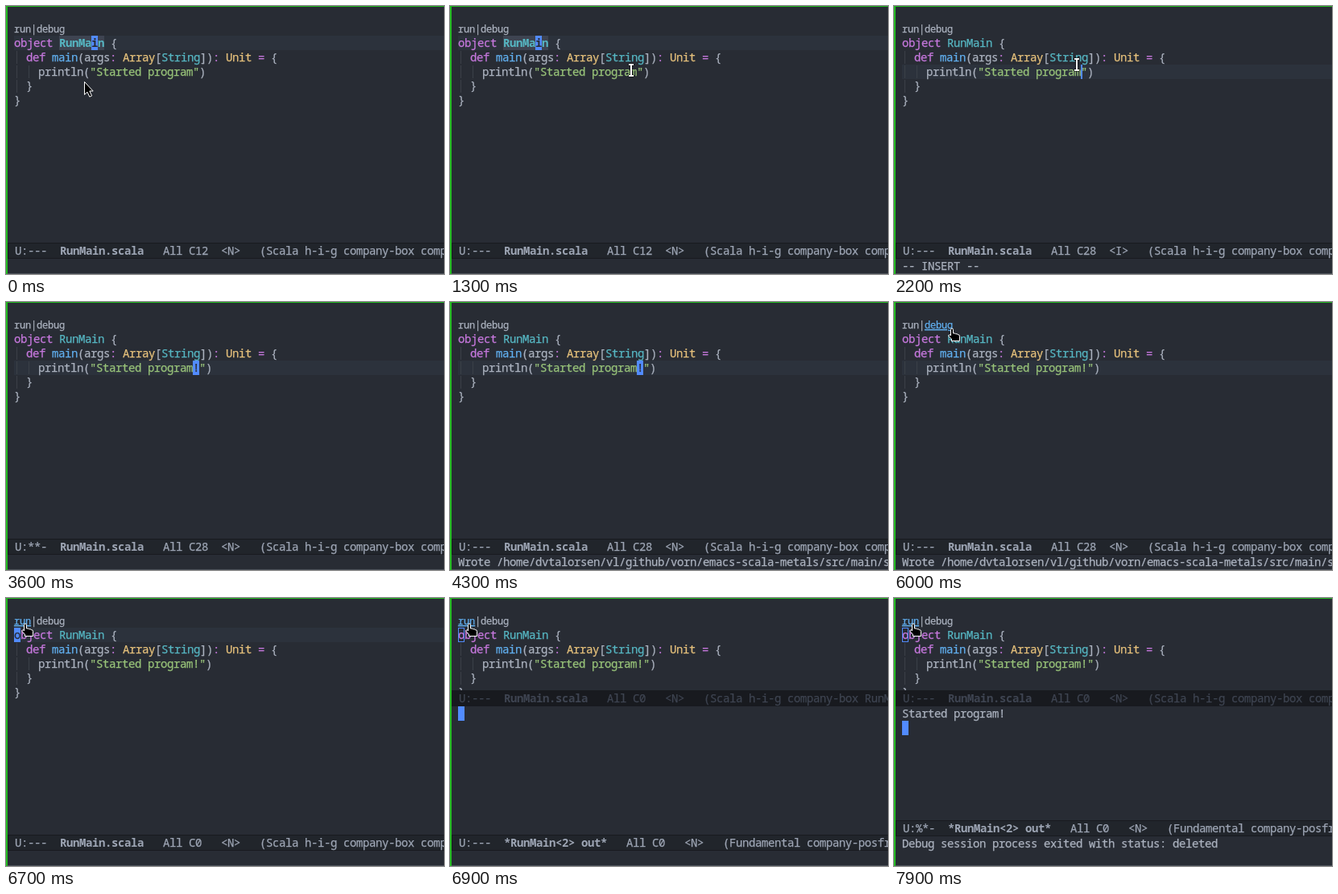
An HTML page for the animation above (8 s loop, 544 by 334 pixels).

```html
<!DOCTYPE html>
<html lang="en">
<head>
<meta charset="utf-8">
<title>Run from the editor</title>
<style>
  html, body { margin: 0; width: 100%; height: 100%; overflow: hidden; background: #282c34; }
  svg { display: block; width: 544px; height: 334px; color: #abb2bf; }
  text { font: 14px "Noto Sans Mono", "DejaVu Sans Mono", monospace; letter-spacing: -.4px; white-space: pre; }
  text, tspan { fill: currentColor; stroke: currentColor; stroke-width: .25px; }
  .lens text { font-size: 12px; letter-spacing: -.2px; }
  .link { color: #61afef; }
  .link text { text-decoration: underline; }
  .bar { color: #9da5b4; }
  .dim { color: #3e4451; }
  .b { font-weight: 600; stroke: none; }
  .kw { color: #c678dd; }
  .fn { color: #61afef; }
  .ty { color: #e5c07b; }
  .cy { color: #56b6c2; }
  .st { color: #98c379; }
  .fg { color: #abb2bf; }
  .hl { fill: #2c323c; }
  .guide { fill: #3b4048; }
  .block { color: #282c34; }
  .block rect, .caret { fill: #528bff; }
  .hollow { fill: none; stroke: #528bff; }
  #mouse path { fill: #000; stroke: #fff; stroke-linejoin: round; }
  #mouse #beam { fill: #fff; stroke: #000; paint-order: stroke; }
</style>
</head>
<body>
<!-- data-show lists the spans, in ms, during which a part is visible -->
<svg viewBox="0 0 544 334">
  <rect width="544" height="334" fill="#282c34"/>

  <g class="lens">
    <text x="31" y="33">|</text>
    <text x="10" y="33" data-show="0-6200">run</text>
    <text x="38" y="33" data-show="0-5900 6100-8000">debug</text>
    <g class="link">
      <text x="10" y="33" data-show="6200-8000">run</text>
      <text x="38" y="33" data-show="5900-6100">debug</text>
    </g>
  </g>

  <rect class="hl" x="10" y="37" width="534" height="18" data-show="0-1600 6700-6900"/>
  <rect class="hl" x="10" y="73" width="534" height="18" data-show="1600-6700"/>
  <rect x="66" y="37" width="56" height="18" fill="#3e4451" data-show="0-1700"/>
  <rect class="guide" x="13" y="56" width="1" height="16"/>
  <rect class="guide" x="13" y="74" width="1" height="16"/>
  <rect class="guide" x="13" y="92" width="1" height="16"/>
  <rect class="guide" x="28" y="74" width="1" height="16"/>

  <text class="kw" x="10" y="51">object</text>
  <text class="cy b" x="66" y="51" data-show="0-1700">RunMain</text>
  <text class="cy" x="66" y="51" data-show="1700-8000">RunMain</text>
  <text x="130" y="51">{</text>
  <text x="25" y="69"><tspan class="kw">def</tspan> <tspan class="fn">main</tspan>(args<tspan class="kw">:</tspan> <tspan class="ty">Array</tspan>[<tspan class="cy">String</tspan>])<tspan class="kw">:</tspan> <tspan class="ty">Unit</tspan> <tspan class="kw">=</tspan> {</text>
  <text x="40" y="87">println(<tspan class="st">"Started program</tspan></text>
  <text class="st" x="232" y="87" data-show="0-2800">"<tspan class="fg">)</tspan></text>
  <text class="st" x="232" y="87" data-show="2800-8000">!"<tspan class="fg">)</tspan></text>
  <text x="25" y="104">}</text>
  <text x="10" y="122">}</text>

  <g class="block">
    <g data-show="0-400 900-1400"><rect x="106" y="37" width="8" height="18"/><text class="b" x="106" y="51">i</text></g>
    <g data-show="1600-2200"><rect x="232" y="73" width="8" height="18"/><text x="232" y="87">"</text></g>
    <g data-show="3600-4100 4300-4900 5400-5900 6400-6700"><rect x="232" y="73" width="8" height="18"/><text x="232" y="87">!</text></g>
    <g data-show="6700-6900"><rect x="10" y="37" width="8" height="18"/><text x="10" y="51">o</text></g>
  </g>
  <rect class="caret" x="232" y="73" width="2" height="18" data-show="2200-2800"/>
  <rect class="caret" x="240" y="73" width="2" height="18" data-show="2800-3400"/>
  <rect class="hollow" x="10.5" y="37.5" width="7" height="17" data-show="6900-8000"/>

  <!-- single window: mode line and echo area -->
  <g class="bar" data-show="0-6900">
    <rect x="2" y="295" width="542" height="20" fill="#181a1f"/>
    <rect x="3" y="296" width="541" height="18" fill="#21252b"/>
    <text x="11" y="310" data-show="0-2800 4300-6900">U:---</text>
    <text x="11" y="310" data-show="2800-4300">U:**-</text>
    <text class="b" x="67" y="310">RunMain.scala</text>
    <text x="195" y="310">All</text>
    <text x="227" y="310" data-show="0-1600">C12</text>
    <text x="227" y="310" data-show="1600-2800 3600-6700">C28</text>
    <text x="227" y="310" data-show="2800-3600">C29</text>
    <text x="227" y="310" data-show="6700-6900">C0</text>
    <text x="267" y="310" data-show="0-2200 3600-6900">&lt;N&gt;</text>
    <text x="267" y="310" data-show="2200-3600">&lt;I&gt;</text>
    <text x="315" y="310">(Scala h-i-g company-box comp</text>
  </g>
  <text x="10" y="329" data-show="2200-2800">-- INSERT --</text>
  <text x="10" y="329" data-show="4300-6700">Wrote /home/dvtalorsen/vl/github/vorn/emacs-scala-metals/src/main/s</text>

  <!-- split window with program output -->
  <g data-show="6900-8000">
    <rect x="2" y="115" width="542" height="219" fill="#282c34"/>
    <g class="dim">
      <rect x="2" y="115" width="542" height="20" fill="#181a1f"/>
      <text x="11" y="130">U:---</text>
      <text class="b" x="67" y="130">RunMain.scala</text>
      <text x="195" y="130">All C0   &lt;N&gt;   (Scala h-i-g company-box</text>
      <text x="515" y="130" data-show="6900-7100">RunM</text>
      <text x="515" y="130" data-show="7100-8000">comp</text>
    </g>
    <text x="10" y="149" data-show="7100-8000">Started program!</text>
    <rect class="caret" x="10" y="135" width="8" height="18" data-show="6900-7100"/>
    <rect class="caret" x="10" y="153" width="8" height="18" data-show="7100-7400 7900-8000"/>
    <g class="bar" id="outBar">
      <rect x="2" y="295" width="542" height="20" fill="#181a1f"/>
      <rect x="3" y="296" width="541" height="18" fill="#21252b"/>
      <text x="11" y="310" data-show="6900-7100">U:---</text>
      <text x="11" y="310" data-show="7100-8000">U:%*-</text>
      <text class="b" x="67" y="310">*RunMain&lt;2&gt; out*</text>
      <text x="219" y="310">All C0   &lt;N&gt;   (Fundamental company-posfr</text>
    </g>
    <text x="10" y="311" data-show="7100-8000">Debug session process exited with status: deleted</text>
  </g>

  <rect y="333" width="544" height="1" fill="#4b5058"/>
  <path d="M0 0H544V1H2V334H0Z" fill="#24ba22"/>

  <g id="mouse">
    <path id="arrow" d="M.5 .5V16.5L4 13.2L6.8 19.2L9.6 17.9L6.8 12H11.2Z"/>
    <path id="beam" d="M-3-8H3V-6H1V6H3V8H-3V6H-1V-6H-3Z"/>
    <path id="hand" d="M-1.5 9V1.5a1.5 1.5 0 0 1 3 0V6H3a1.5 1.5 0 0 1 1.5 .8H6a1.5 1.5 0 0 1 1.5 1H8A1.5 1.5 0 0 1 9.5 9.3V15.5H-.5V13L-4 9.8a1.4 1.4 0 0 1 2-1.8Z"/>
  </g>
</svg>
<script>
  const LOOP = 8000, STEP = 100;
  const byId = id => document.getElementById(id);
  const mouse = byId('mouse'), outBar = byId('outBar');
  const shapes = ['arrow', 'beam', 'hand'].map(byId);

  const parts = [...document.querySelectorAll('[data-show]')].map(el => ({
    el, spans: el.dataset.show.split(' ').map(s => s.split('-').map(Number))
  }));

  // pointer stops: time, x, y
  const stops = [
    [0, 97, 94], [300, 97, 94], [400, 100, 98], [500, 118, 99], [600, 150, 95],
    [900, 242, 80], [1000, 234, 80], [1200, 234, 80], [1300, 225, 80],
    [1400, 230, 79], [1500, 230, 79], [1600, 234, 76], [5200, 194, 58],
    [5300, 194, 58], [5600, 128, 44], [5900, 76, 29], [6000, 72, 33],
    [6100, 36, 26], [6200, 28, 24], [6400, 24, 32], [LOOP, 24, 32]
  ];

  function pointAt(t) {
    const i = stops.findIndex(s => s[0] > t);
    const [t0, x0, y0] = stops[i - 1], [t1, x1, y1] = stops[i];
    const k = (t - t0) / (t1 - t0);
    return [Math.round(x0 + (x1 - x0) * k), Math.round(y0 + (y1 - y0) * k)];
  }

  const shapeAt = t => t < 700 ? 'arrow' : t < 5900 ? 'beam' : 'hand';

  function draw() {
    const t = Math.floor(performance.now() % LOOP / STEP) * STEP;
    for (const { el, spans } of parts) {
      el.style.display = spans.some(([a, b]) => t >= a && t < b) ? '' : 'none';
    }
    outBar.setAttribute('transform', `translate(0 ${t < 7100 ? 0 : -18})`);

    // the pointer hides while typing
    mouse.style.display = t >= 2800 && t < 5300 ? 'none' : '';
    mouse.setAttribute('transform', `translate(${pointAt(t)})`);
    for (const s of shapes) s.style.display = s.id === shapeAt(t) ? '' : 'none';
    requestAnimationFrame(draw);
  }
  draw();
</script>
</body>
</html>
```
